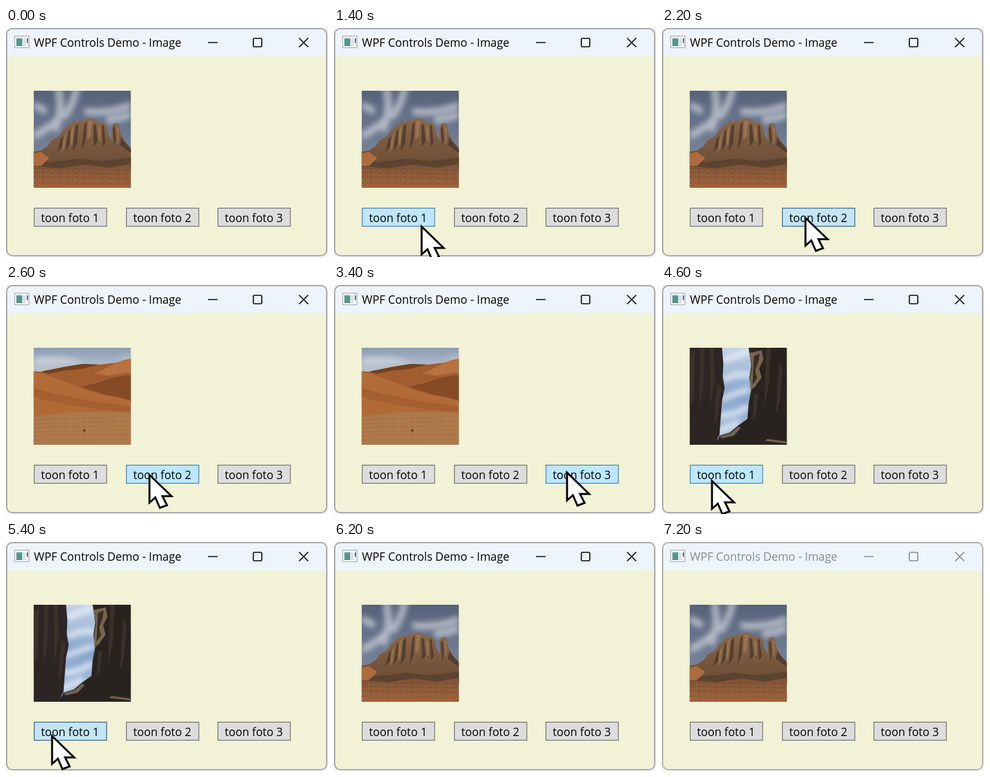
Recreate the animation shown at these times as an HTML page. Size 496 by 354 pixels, loop 7400 ms.

```html
<!DOCTYPE html>
<html lang="nl">
<head>
<meta charset="utf-8">
<title>WPF Controls Demo - Image</title>
<style>
  html, body { margin: 0; width: 100%; height: 100%; overflow: hidden; background: #f4f4f4; }
  svg { display: block; }
  text { font: 17.3px "Open Sans", "Noto Sans", sans-serif; fill: #000; }
  .title { font-size: 17.45px; }
  .window { fill: #f2f2d6; }
  .border { fill: none; stroke: #aaa7ac; stroke-width: 2; }
  .glyphs { fill: none; stroke: #000; stroke-width: 1.6; }
  .inactive .title { fill: #898c90; }
  .inactive .glyphs { stroke: #85888c; }
  .inactive .border { stroke: #b2b2b4; }
  .button rect { fill: #ddd; stroke: #707070; stroke-width: 1.2; }
  .button.hover rect { fill: #bee6fd; stroke: #3c7fb1; }
  .button.pressed rect { fill: #c4e5f6; stroke: #2c628b; }
  .pointer { fill: #fff; stroke: #000; stroke-width: 3; stroke-miterlimit: 6; }
</style>
</head>
<body>
<svg width="496" height="354" viewBox="0 0 496 354">
  <defs>
    <linearGradient id="storm" x2="0" y2="1">
      <stop stop-color="#56627a"/><stop offset=".65" stop-color="#78849b"/>
    </linearGradient>
    <linearGradient id="rock" x2="0" y2="1">
      <stop stop-color="#896748"/><stop offset="1" stop-color="#6a4b33"/>
    </linearGradient>
    <linearGradient id="soil" x2="0" y2="1">
      <stop stop-color="#7b5238"/><stop offset="1" stop-color="#a0623a"/>
    </linearGradient>
    <linearGradient id="haze" x2="0" y2="1">
      <stop stop-color="#8a9bb4"/><stop offset=".25" stop-color="#bdc6d1"/>
    </linearGradient>
    <linearGradient id="dune" x2="0" y2="1">
      <stop stop-color="#b36c39"/><stop offset=".55" stop-color="#b06a37"/><stop offset="1" stop-color="#a87042"/>
    </linearGradient>
    <linearGradient id="gap" x2="0" y2="1">
      <stop stop-color="#c3d3e6"/><stop offset=".5" stop-color="#85a3cb"/><stop offset="1" stop-color="#b3c8e2"/>
    </linearGradient>
    <filter id="soft" x="-20%" y="-50%" width="140%" height="200%"><feGaussianBlur stdDeviation="4"/></filter>
    <clipPath id="frame"><rect width="150" height="150"/></clipPath>
    <clipPath id="corners"><rect x="1" y="1" width="493" height="351" rx="9"/></clipPath>
  </defs>

  <g id="window">
    <g clip-path="url(#corners)">
      <path class="window" d="M0 0H496V354H0Z"/>
      <path fill="#edf4fb" d="M0 0H496V44H0Z"/>
    </g>
    <rect class="border" x="1" y="1" width="493" height="351" rx="9"/>

    <rect x="13.5" y="12.5" width="22" height="18" fill="#f8f8f8" stroke="#a3a6aa"/>
    <path fill="#5a958f" d="M16 16H25V28H16Z"/>
    <path fill="#d9dde1" d="M26 16H30V28H26Z"/>
    <path fill="#39679b" d="M32 16H34V23H32Z"/>
    <text class="title" x="43" y="29">WPF Controls Demo - Image</text>
    <g class="glyphs">
      <path d="M311 22.500H326M451.500 15.500L465.500 29.500M465.500 15.500L451.500 29.500"/>
      <rect x="381" y="16" width="13" height="13" rx="1.500"/>
    </g>

    <g transform="translate(42.500 97)" clip-path="url(#frame)">
      <g class="photo">
        <path fill="url(#storm)" d="M0 0H150V150H0Z"/>
        <g filter="url(#soft)" fill="none" stroke="#d2d6de" stroke-width="11" opacity=".7">
          <path d="M38 -5Q46 35 32 62M66 -5Q63 20 46 42M0 70Q24 58 38 44M0 22L20 32"/>
          <path d="M78 32Q118 36 150 22M112 46Q135 44 150 36"/>
        </g>
        <path fill="url(#rock)" d="M0 94L12 92L22 85L28 76L39 71L46 61L54 53L63 48L75 47L83 43L94 44L100 50L108 49L113 55L115 67L121 77L120 56L124 50L131 51L134 66L141 79L150 88V122H0Z"/>
        <path fill="#43332a" opacity=".7" d="M64 55L69 51L67 82L60 94ZM78 52L82 47L80 78L74 92ZM92 51L96 53L99 78L93 86ZM105 54L108 53L111 80L107 86ZM122 58L125 54L127 76L124 86ZM42 74L46 69L44 86L36 96ZM54 62L57 58L55 84L49 92ZM135 72L150 91V96L133 84Z"/>
        <path fill="#aa8158" opacity=".6" d="M84 47L90 46L88 70L83 76ZM58 58L62 54L60 80L56 88ZM99 56L103 56L103 78L101 80ZM128 54L131 57L131 78L129 80ZM46 72L50 66L48 88L44 94Z"/>
        <path fill="#5b4330" d="M14 111L40 109L68 105L106 109L150 103V121H8Z"/>
        <path fill="#ad6c3f" d="M0 97L12 95L24 104L12 116H0Z"/>
        <path fill="url(#soil)" d="M0 116L40 120L80 114L115 119L150 113V150H0Z"/>
        <path fill="none" stroke="#5b3927" stroke-dasharray="3 5 1 4" opacity=".6" d="M0 120L150 123M0 126L150 128M0 133L150 135M0 142L150 144"/>
        <path fill="none" stroke="#bd7947" stroke-dasharray="2 7 4 5" opacity=".6" d="M0 123L150 126M0 130L150 132M0 138L150 139M0 146L150 147"/>
      </g>

      <g class="photo">
        <path fill="url(#haze)" d="M0 0H150V150H0Z"/>
        <path filter="url(#soft)" fill="#e1e5e9" opacity=".6" d="M0 16Q35 10 70 20T150 8V14Q95 26 0 25Z"/>
        <path fill="#a15d30" d="M0 36L18 38L45 30L76 25L101 26L128 23L140 19L150 17V90H0Z"/>
        <path fill="#74401f" d="M10 37L45 30L76 25L101 26L78 32L48 35L25 40Z"/>
        <path fill="#864a25" d="M150 42Q122 45 96 55L72 60L150 85Z"/>
        <path fill="#b87140" d="M128 23L150 17V38L115 43L94 40Z"/>
        <path fill="url(#dune)" d="M0 37Q27 43 60 57T116 74Q136 77 150 82V150H0Z"/>
        <path fill="#944f26" opacity=".4" d="M0 62Q50 78 150 91V99Q62 94 0 76Z"/>
        <path fill="#ad794a" d="M0 107Q72 95 150 101V150H0Z"/>
        <path fill="none" stroke="#8b5932" stroke-dasharray="6 3 2 4" opacity=".5" d="M0 112L150 106M0 118L150 113M0 124L150 120M0 130L150 127M0 136L150 134M0 143L150 142"/>
        <path fill="#40291b" d="M77 126H79V130H77Z"/>
      </g>

      <g class="photo">
        <path fill="url(#gap)" d="M0 0H150V150H0Z"/>
        <path filter="url(#soft)" fill="none" stroke="#edf3f9" stroke-width="8" opacity=".85" d="M50 20L92 5M52 50Q70 38 96 42M46 80L92 64M46 105Q65 106 92 90M44 129L76 115"/>
        <path fill="#2d2523" d="M0 0H50L52 25L51 45L54 62L50 82L48 108L46 135L43 140V150H0Z"/>
        <path fill="#443630" opacity=".7" d="M0 12L8 4L7 72L0 94ZM16 0H23L21 60L15 95ZM31 0H37L39 50L32 90ZM42 52L49 62L43 105L38 122Z"/>
        <path fill="#29231f" d="M91 0H150V150H40L46 136L62 131L75 120L89 110L91 86L95 65L92 46L95 28Z"/>
        <path fill="#78634d" d="M92 8L111 4L114 18L107 32L111 46L101 60L94 66L93 47L96 29Z"/>
        <path fill="#3a2e26" d="M99 13L108 9L106 22L101 35L104 47L97 57L98 32Z"/>
        <path fill="#453a30" opacity=".65" d="M118 0H125L122 58L115 91ZM138 22L143 30L139 83L133 102ZM99 74L106 70L102 104L97 111Z"/>
        <path fill="#72614e" d="M46 137L63 132L75 122L79 124L68 136L50 140ZM120 141L150 145V148L116 144Z"/>
      </g>
    </g>
    <g id="buttons"></g>
  </g>
  <path id="pointer" class="pointer" d="M2 4V47L11 39L18 55L29 51L22 37H36Z"/>
</svg>
<script>
const LOOP = 7400;
const photos = [...document.querySelectorAll(".photo")];
const appWindow = document.getElementById("window");
const pointer = document.getElementById("pointer");
const buttonLayer = document.getElementById("buttons");

buttonLayer.innerHTML = [43, 185, 326].map((x, i) =>
  `<g class="button" transform="translate(${x} 278)">
     <rect x=".5" y=".5" width="111.5" height="28"/>
     <text x="11" y="22">toon foto ${i + 1}</text>
   </g>`).join("");
const buttons = [...buttonLayer.children];

// Each track lists [start time, value...]; values hold until the next entry.
const pointerTrack = [
  [0], [1400, 133, 303], [1600, 192, 285], [1800, 219, 289.5],
  [3000, 275, 281], [3200, 357, 286], [4400, 361, 311],
  [4600, 75, 299], [4800, 65, 297], [5000, 69, 296], [6200]
];
const hoverTrack = [[0], [1400, 0], [1600, 1], [3200, 2], [4400], [4600, 0], [6200]];
const photoTrack = [[0, 0], [2600, 1], [4000, 2], [5600, 0]];
const presses = [[2200, 2600], [3800, 4000], [5400, 5600]];

const valueAt = (track, time) => track.findLast(([start]) => start <= time).slice(1);

function render(now) {
  const time = now % LOOP;
  const [x, y] = valueAt(pointerTrack, time);
  const [hovered] = valueAt(hoverTrack, time);
  const [shown] = valueAt(photoTrack, time);
  const isPressed = presses.some(([down, up]) => time >= down && time < up);

  pointer.style.display = x === undefined ? "none" : "";
  if (x !== undefined) pointer.setAttribute("transform", `translate(${x} ${y})`);
  buttons.forEach((button, i) => {
    button.classList.toggle("hover", i === hovered);
    button.classList.toggle("pressed", i === hovered && isPressed);
  });
  photos.forEach((photo, i) => { photo.style.display = i === shown ? "" : "none"; });
  appWindow.classList.toggle("inactive", time >= 7200);
}

const start = performance.now();
function tick() {
  render(performance.now() - start);
  requestAnimationFrame(tick);
}
tick();
</script>
</body>
</html>
```
